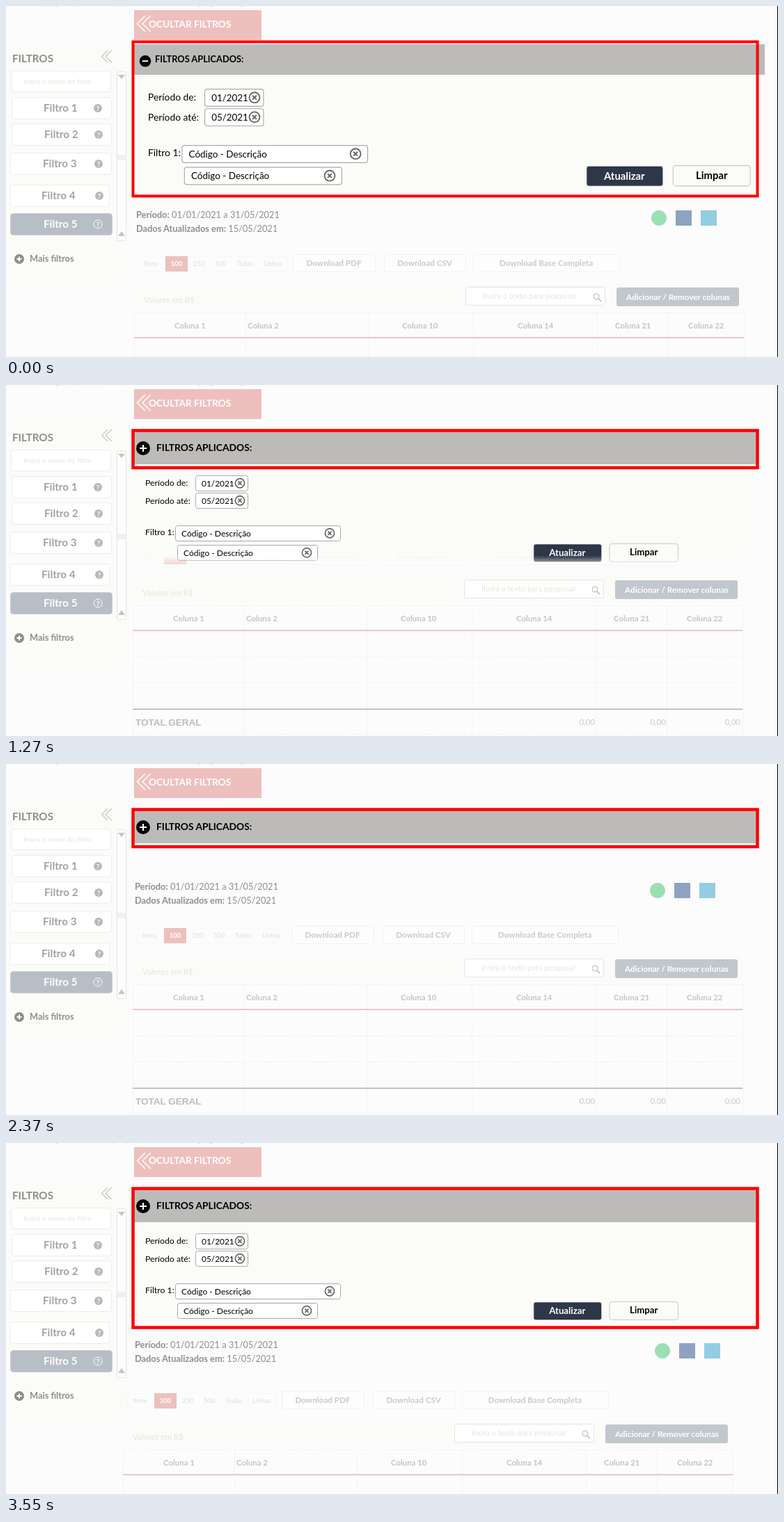
Animation of 1109 by 505 pixels, one loop 4.98 s. Source, as an HTML page:

```html
<!DOCTYPE html>
<html lang="pt">
<head>
<meta charset="utf-8">
<style>
  html, body { margin: 0; width: 100%; height: 100%; overflow: hidden; background: #fcfcfd; }
  svg { display: block; font-family: Lato, sans-serif; }
</style>
</head>
<body>
<svg id="stage" width="1109" height="505"></svg>
<script>
const LOOP = 4980, COLLAPSE = 1230, EXPAND = 2560;
const TINT = '#fbfbf8', DARK = '#2d3748', SLATE = '#b7bec5', ROSE = '#edc0be',
  GREY = '#8e8e8e', FAINT = '#e6e5dc', RED = '#f00';

const rect = (x, y, w, h, fill, stroke = 'none', r = 0, sw = 1) =>
  `<rect x="${x}" y="${y}" width="${w}" height="${h}" rx="${r}" fill="${fill}" stroke="${stroke}" stroke-width="${sw}"/>`;
const text = (x, y, s, size, fill = '#000', weight = 400, anchor = 'start', extra = '') =>
  `<text x="${x}" y="${y}" font-size="${size}" fill="${fill}" font-weight="${weight}" text-anchor="${anchor}" ${extra}>${s}</text>`;
const circle = (x, y, r, fill, stroke = 'none', sw = 1) =>
  `<circle cx="${x}" cy="${y}" r="${r}" fill="${fill}" stroke="${stroke}" stroke-width="${sw}"/>`;
const path = (d, stroke, sw = 1, extra = '') =>
  `<path d="${d}" fill="none" stroke="${stroke}" stroke-width="${sw}" ${extra}/>`;
const group = (id, content, attrs = '') => `<g id="${id}" ${attrs}>${content}</g>`;

const chevrons = (x, y, h, color, sw) => [0, h / 3].map(dx =>
  path(`M${x + dx + h / 2} ${y}l${-h / 2} ${h / 2}l${h / 2} ${h / 2}`, color, sw)).join('');
const closeIcon = (x, y) => circle(x, y, 6.6, '#fff', '#686868', 1.7) +
  path(`M${x - 2.6} ${y - 2.6}l5.2 5.2m0 -5.2l-5.2 5.2`, '#686868', 1.8);
const signIcon = (x, y, r, color, plus) => circle(x, y, r, color) +
  path(`M${x - r / 2} ${y}h${r}` + (plus ? `M${x} ${y - r / 2}v${r}` : ''), '#fff', 2);

function sidebarButton(n, x, y, w, textX, iconX) {
  const on = n === 5;
  return rect(x + .5, y + .5, w, 31, on ? SLATE : '#fff', on ? '#c8cdd0' : '#ebebeb', 4) +
    text(textX, y + 21, 'Filtro ' + n, 15.2, on ? '#fff' : '#a2a2a2', 700) +
    circle(iconX, y + 16, 6, on ? 'none' : '#b8b8b8', on ? '#fff' : 'none') +
    text(iconX, y + 19.5, '?', 10, '#fff', 700, 'middle');
}

function sidebar() {
  return rect(2, 54, 176, 351, TINT) +
    text(9, 81, 'FILTROS', 15.2, GREY, 700) + chevrons(137.5, 64, 17, '#c4c4c4', 1.2) +
    rect(7.5, 93.5, 143, 30, '#fff', '#ebebeb', 4) +
    text(25, 112, 'Insira o nome do filtro', 10.2, FAINT) +
    rect(159.5, 94.5, 13, 243, '#fdfdfd', '#e4e4e4', 2) +
    rect(160, 214, 12, 8, '#f0f0f0') +
    '<path d="M161 99h10l-5 6zM161 331h10l-5 -7z" fill="#c4c4c4"/>' +
    sidebarButton(1, 8, 131, 143, 54, 132) + sidebarButton(2, 8, 169, 143, 55, 133) +
    sidebarButton(3, 6, 211, 145, 53, 133) + sidebarButton(4, 5, 257, 143, 51, 134) +
    sidebarButton(5, 6, 298, 146, 54, 132) +
    signIcon(19, 364, 7, GREY, true) + text(34, 368, 'Mais filtros', 12.8, GREY, 700);
}

function field(x, y, w, h, value, textX, size) {
  return rect(x + .5, y + .5, w, h, '#fff', '#a9a9a9', 3) +
    text(textX, y + h / 2 + 4.7, value, size) + closeIcon(x + w - (w < 100 ? 11 : 15), y + h / 2 + .3);
}

// Applied filters, relative to the top of the first field row
function filterForm(updateX, clearX) {
  return text(0, 14.7, 'Período de:', 12.3) + field(72, 0, 75, 22, '01/2021', 81, 11.9) +
    text(0, 40.6, 'Período até:', 12.3) + field(72, 25, 75, 22, '05/2021', 81, 11.9) +
    text(0, 86, 'Filtro 1:', 12.3) + field(43, 72, 237, 22, 'Código - Descrição', 52, 12) +
    field(46, 100, 201, 22, 'Código - Descrição', 55, 12) +
    rect(updateX, 99, 97.5, 25.5, DARK, '#ccc', 3, .7) +
    text(updateX + 48.3, 116, 'Atualizar', 13.2, '#fff', 700, 'middle') +
    rect(clearX, 98.3, 98.5, 26, TINT, '#c4c6cc', 3.5) +
    text(clearX + 49.3, 115.4, 'Limpar', 13.2, '#000', 700, 'middle');
}

const bold = s => `<tspan font-weight="700">${s}</tspan>`;

function dates() {
  return text(187, 305, bold('Período:') + ' 01/01/2021 a 31/05/2021', 12.8, GREY) +
    text(187, 325, bold('Dados Atualizados em:') + ' 15/05/2021', 12.8, GREY);
}
function shareMarks() {
  return circle(938, 305, 11, '#9be0b2') + rect(962, 294, 23, 22, '#8fa2c2') + rect(998, 294, 23, 22, '#93cde3');
}

function table() {
  const edges = [184, 344, 520, 671, 849, 951, 1060];
  const pager = [[198, 'Itens'], [269, '250'], [300, '500'], [331, 'Todas'], [370, 'Linhas']];
  const downloads = [[412, 118, 'Download PDF'], [543, 117, 'Download CSV'], [671, 210, 'Download Base Completa']];
  const columns = [[242, 1], [347, 2], [569, 10], [735, 14], [875, 21], [980, 22]];
  const dotted = 'stroke-dasharray="1 2"';
  return rect(190.5, 360.5, 213, 21, 'none', '#f7f7f4') +
    pager.map(([x, s]) => text(x, 374, s, 9.5, '#dddcd5')).join('') +
    rect(229, 360, 32, 22, ROSE) + text(245, 374, '100', 9.5, '#fff', 700, 'middle') +
    downloads.map(([x, w, s]) => rect(x + .5, 357.5, w, 25, '#fdfdfd', '#f2f2ee', 2) +
      text(x + w / 2, 374, s, 11.7, '#c9c9c5', 700, 'middle')).join('') +
    rect(184, 398, 876, 39, TINT) + text(198, 427, 'Valores em R$', 11.6, FAINT) +
    rect(660.5, 404.5, 200, 26, '#fff', '#e4e4e1', 3) +
    text(685, 421, 'Insira o texto para pesquisar', 11, FAINT) +
    circle(848, 418, 4, 'none', '#b4b4b4') + path('M851 421l4 4', '#b4b4b4', 1.5) +
    rect(877, 405, 176, 27, '#c0c7cd', 'none', 3) +
    text(965.5, 422.5, 'Adicionar / Remover colunas', 11.7, '#fff', 700, 'middle') +
    columns.map(([x, n]) => text(x, 463.5, 'Coluna ' + n, 11.4, '#c4c4bf', 700)).join('') +
    edges.map(x => path(`M${x + .5} 441V640`, '#e4e4dc', 1, dotted)).join('') +
    [441, 515, 552, 626].map(y => path(`M184 ${y + .5}H1060`, '#e6e6df', 1, dotted)).join('') +
    path('M184 477.2H1060', '#e8b4ba', 1.5) + path('M184 590.5H1060', '#adadad', 1.5) +
    text(188, 614, 'TOTAL GERAL', 13.5, '#bcbcbc', 700, 'start', 'font-family="Liberation Sans, sans-serif"') +
    [848, 950, 1057].map(x => text(x, 613, '0,00', 11.5, '#c9c9c5', 400, 'end')).join('');
}

const title = (x, y, size) => text(x, y, 'FILTROS APLICADOS:', size, '#000', 700);

stage.innerHTML = `
  <defs>
    <linearGradient id="edge" gradientUnits="userSpaceOnUse" x1="0" x2="0">
      <stop stop-color="#fff"/><stop offset="1" stop-color="#000"/>
    </linearGradient>
    <mask id="wipe" maskUnits="userSpaceOnUse" x="0" y="0" width="1109" height="505">
      ${rect(0, 0, 1109, 505, 'url(#edge)')}
    </mask>
  </defs>` +
  rect(0, 0, 1109, 505, '#fcfcfd') +
  text(57, -1.2, 'página apresenta, por período, os dados agregados segundo filtro', 12, '#d9d6bd') +
  rect(184, 6, 183, 43, ROSE) + chevrons(188.5, 14, 23, '#fff', 1.5) +
  group('toggleLabel', text(205, 30.5, 'OCULTAR FILTROS', 13.7, '#fff', 700)) +
  sidebar() +
  group('dateLines', dates()) + group('share', shareMarks()) + group('grid', table()) +
  group('openPanel',
    rect(184, 99, 895, 174, TINT) + rect(184, 55, 906, 44, '#bcbbb9') +
    signIcon(200, 79.3, 8.3, '#000', false) + title(214, 81.4, 12.8) +
    group('', filterForm(560, 670.5), 'transform="translate(204 119) scale(1.125)"') +
    rect(182.5, 51.5, 897, 222, 'none', RED, 0, 4)) +
  group('slidingPanel',
    group('', rect(182, 114, 897, 153, TINT) +
      group('', filterForm(558, 667), 'transform="translate(200 130)"'), 'mask="url(#wipe)"') +
    rect(184, 67, 895, 47, '#bcbbb9') +
    signIcon(197, 91, 10, '#000', true) + title(216, 95, 13.8) +
    `<rect id="frame" x="182.5" y="65.5" width="897" fill="none" stroke="${RED}" stroke-width="4.5"/>`) +
  path('M1108.5 0V505', '#000');

const $ = id => document.getElementById(id);
const move = (id, x, y) => $(id).setAttribute('transform', `translate(${x} ${y})`);

function draw(now) {
  const t = now % LOOP;
  const sliding = t >= COLLAPSE, expanded = t >= EXPAND;
  const collapsed = sliding && !expanded;

  $('openPanel').style.display = sliding ? 'none' : '';
  $('slidingPanel').style.display = sliding ? '' : 'none';
  move('toggleLabel', 0, expanded ? -1 : 0);
  move('dateLines', sliding ? -2 : 0, collapsed ? -124 : expanded ? -10 : 0);
  move('share', collapsed ? -2 : expanded ? 5 : 0, collapsed ? -123 : expanded ? -6 : 0);
  move('grid', collapsed ? -2 : expanded ? -16 : 0, collapsed ? -124 : 0);
  $('frame').setAttribute('height', collapsed ? 53.5 : 200);

  const y = expanded ? Math.min(300, 110 + (t - EXPAND) * .335)
                     : Math.max(90, 269 - (t - COLLAPSE) * .33);
  $('edge').setAttribute('y1', y - 10);
  $('edge').setAttribute('y2', y + 10);
  requestAnimationFrame(() => draw(performance.now()));
}
draw(performance.now());
</script>
</body>
</html>
```
